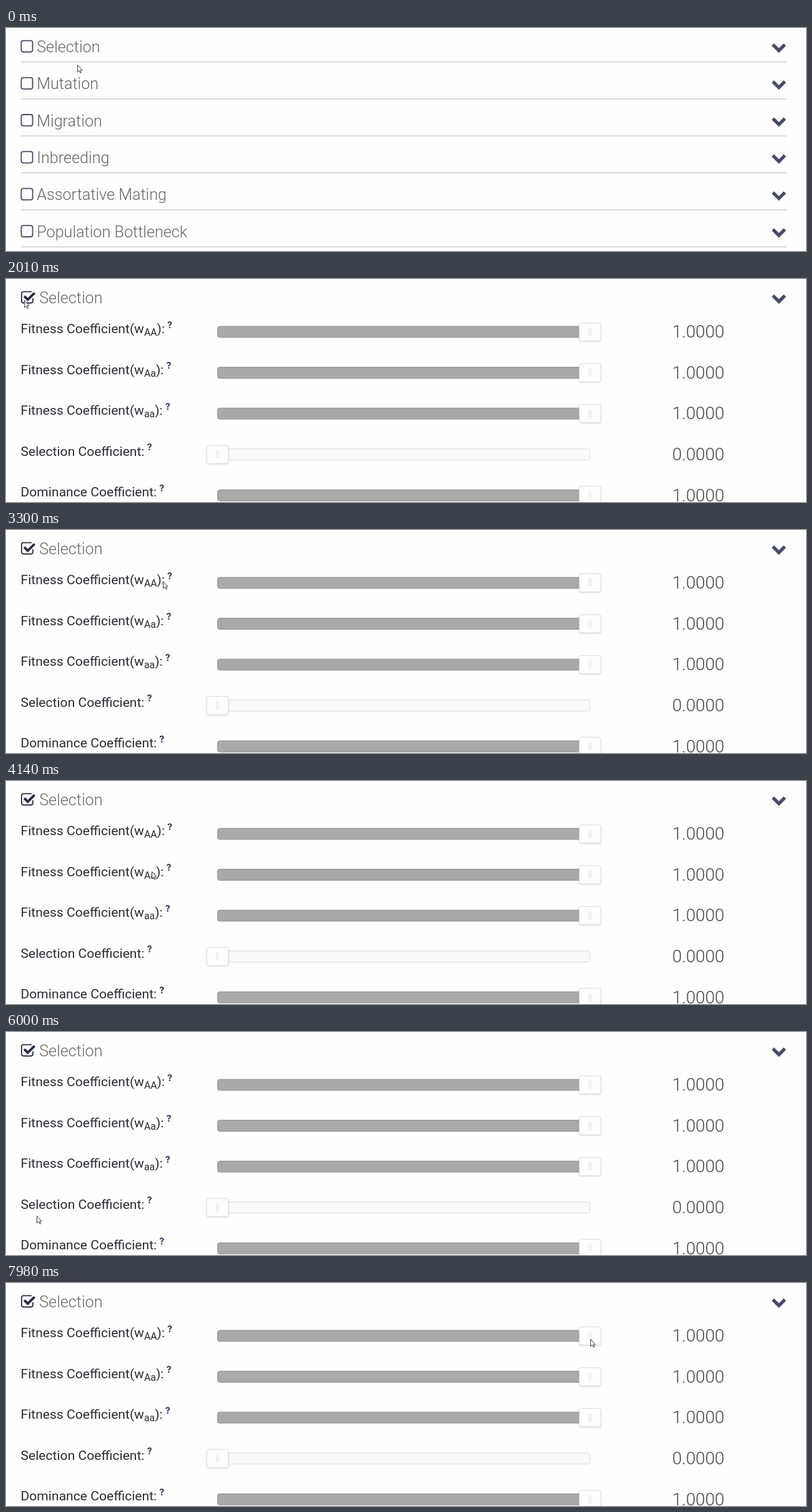
An HTML page that plays this animation: 1280 by 358 pixels, repeating every 8 s.

```html
<!DOCTYPE html>
<html lang="en">
<head>
<meta charset="utf-8">
<title>Evolution settings</title>
<style>
  html, body { margin: 0; width: 100%; height: 100%; overflow: hidden; background: #fefefe; }
  svg { display: block; font-family: Roboto, sans-serif; }
  .title { font-size: 25.2px; font-weight: 300; fill: #666; }
  .label { font-size: 21.1px; fill: #2b2b33; }
  .sub { font-size: 15.8px; }
  .help { font-size: 15.2px; font-weight: 900; fill: #414766; }
  .value { font-size: 27.7px; font-weight: 300; fill: #444; text-anchor: middle; }
  .box { fill: none; stroke: #4a4866; stroke-width: 1.8; }
  .chevron { fill: none; stroke: #454b69; stroke-width: 5.2; }
  .rule { stroke: #bababa; }
  .handle { fill: #fefefe; stroke: #dcdcdc; filter: drop-shadow(0 1px 1px #0002); }
  .grip { stroke: #dedede; }
  .checked { stroke: #262d45; }
</style>
</head>
<body>
<svg width="1280" height="358" viewBox="0 0 1280 358">
  <g id="list"></g>
  <g id="panel"></g>
  <path id="cursor" d="M.5 .5V11.8L3.2 9.4 5 13.3 6.6 12.6 4.9 8.8H8Z" fill="#fff" stroke="#3c3c44" stroke-linejoin="round"/>
</svg>
<script>
const $ = id => document.getElementById(id);

const rows = (items, pitch, render) => items.map((item, i) =>
  `<g transform="translate(0 ${i * pitch})">${render(item)}</g>`).join('');

const heading = (name, x) => `
  <text class="title" x="${x}" y="39">${name}</text>
  <path class="chevron" d="M1227 26.6l9.6 9.6 9.6-9.6"/>`;

const topics = ['Selection', 'Mutation', 'Migration', 'Inbreeding', 'Assortative Mating', 'Population Bottleneck'];
$('list').innerHTML = rows(topics, 59.35, name => `
  <rect class="box" x="24.4" y="20.3" width="18.2" height="18.2" rx="3.2"/>
  ${heading(name, 49.2)}
  <path class="rule" d="M24 54.6H1249"/>`);

const fitness = ['AA', 'Aa', 'aa'].map(allele =>
  `Fitness Coefficient(w<tspan class="sub" dy="4">${allele}</tspan><tspan dy="-4">):</tspan>`);
const labels = [...fitness, 'Selection Coefficient:', 'Dominance Coefficient:'];

function slider(label) {
  const value = label.startsWith('Selection') ? 0 : 1;
  const [fill, stroke] = value ? ['#a9a9a9', '#8f8f8f'] : ['#fafafa', '#dcdcdc'];
  return `
    <text class="label" x="23.5" y="87">${label}<tspan class="help" dx="4.3" dy="-8.4">?</tspan></text>
    <rect x="338.5" y="76" width="596" height="17.8" rx="3.5" fill="${fill}" stroke="${stroke}"/>
    <g transform="translate(${338.5 + 596 * value} 84.9)">
      <rect class="handle" x="-17.3" y="-14.5" width="34.6" height="29" rx="3"/>
      <path class="grip" d="M-1.5 -6.5v13M1.5 -6.5v13"/>
    </g>
    <text class="value" x="1107.7" y="94.3">${value.toFixed(4)}</text>`;
}

$('panel').innerHTML = `
  <path class="box checked" d="M41 20.7Q40 20.4 39.8 20.4H28.1a3.2 3.2 0 0 0-3.2 3.2V35.3a3.2 3.2 0 0 0 3.2 3.2H39.8a3.2 3.2 0 0 0 3.2-3.2V31"/>
  <path class="checked" d="M29.2 27.6l5.6 5.6 10.9-10.9" fill="none" stroke-width="4"/>
  ${heading('Selection', 53.2)}
  ${rows(labels, 65.6, slider)}`;

// Each cursor move: start and end time, destination, optional bend of the path
const home = [114, 59];
const moves = [
  [840, 1350, [29, 34]],
  [2550, 3090, [387, 82], [261, 80]],
  [3090, 3360, [240, 82]],
  [3720, 4140, [233, 145]],
  [4230, 4530, [230, 201]],
  [4620, 4710, [230, 205]],
  [4890, 5190, [223, 281]],
  [5340, 6000, [49, 295], [120, 250]],
  [6420, 6990, [194, 346], [90, 225]],
  [7110, 7920, [927, 91]],
  [7950, 7980, [935, 90]]
];

const ease = u => u * u / (u * u + (1 - u) * (1 - u));
const mix = (a, b, e) => a.map((v, i) => v + (b[i] - v) * e);

function cursorAt(t) {
  let from = home;
  for (const [start, end, to, bend] of moves) {
    if (t <= start) break;
    if (t < end) {
      const e = ease((t - start) / (end - start));
      return bend ? mix(mix(from, bend, e), mix(bend, to, e), e) : mix(from, to, e);
    }
    from = to;
  }
  return from;
}

const firstBox = document.querySelector('#list .box');

function draw(now) {
  const t = Math.floor(now % 8000 / 30) * 30;
  const open = t >= 2010;
  $('list').style.display = open ? 'none' : '';
  $('panel').style.display = open ? '' : 'none';
  firstBox.style.stroke = t >= 1260 ? '#262632' : '';
  $('cursor').setAttribute('transform', `translate(${cursorAt(t).map(Math.round)})`);
}

function tick() {
  draw(performance.now());
  requestAnimationFrame(tick);
}
tick();
</script>
</body>
</html>
```
